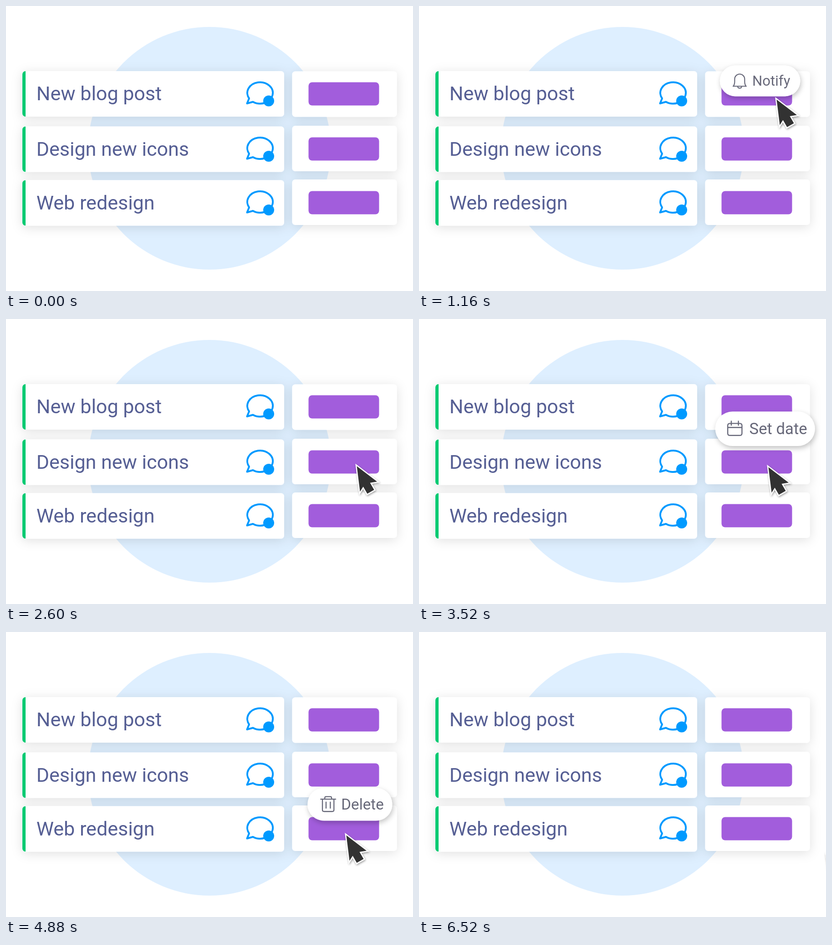
An HTML page for the animation above (8040 ms loop, 894x626 px).

```html
<!DOCTYPE html>
<html lang="en">
<head>
<meta charset="utf-8">
<title>Task board actions</title>
<style>
  html, body { margin: 0; width: 100%; height: 100%; overflow: hidden; background: #fff; }
  svg { display: block; width: 100vw; height: 100vh; }
  text { font-family: Roboto, Arial, sans-serif; }
  .title { font-size: 43px; fill: #565f94; }
  .label { font-size: 35.5px; fill: #676879; }
  .icon { fill: none; stroke: #676879; stroke-width: 2.5; stroke-linecap: round; stroke-linejoin: round; }
</style>
</head>
<body>
<svg viewBox="0 0 894 626" xmlns="http://www.w3.org/2000/svg">
  <defs>
    <filter id="cardShadow" filterUnits="userSpaceOnUse" x="-20" y="80" width="940" height="480">
      <feDropShadow dx="0" dy="4" stdDeviation="12" flood-color="#000" flood-opacity=".12"/>
    </filter>
    <filter id="pillShadow" x="-20%" y="-40%" width="140%" height="190%">
      <feDropShadow dx="2" dy="5" stdDeviation="6" flood-color="#000" flood-opacity=".24"/>
    </filter>
    <filter id="cursorShadow" x="-30%" y="-30%" width="160%" height="160%">
      <feDropShadow dx="1" dy="2" stdDeviation="2" flood-color="#000" flood-opacity=".4"/>
    </filter>
    <clipPath id="cardClip"><rect x="36" y="143" width="575" height="100" rx="7"/></clipPath>
  </defs>

  <circle cx="447" cy="312.5" r="266.5" fill="#deefff"/>
  <g id="cards" fill="#fff" filter="url(#cardShadow)"></g>
  <g id="rows"></g>
  <g id="pills"></g>
  <g id="cursor">
    <path d="M1.5 3.5 46 37.5 30.5 40 39.5 55.5 24.5 64 15.5 48.5 8.5 59.5Z" fill="#333" stroke="#fff"
          stroke-width="5" stroke-miterlimit="8" paint-order="stroke" filter="url(#cursorShadow)"/>
  </g>
</svg>

<script>
const LOOP = 8040, STEP = 40, PERIOD = 1680;
const PILL_START = 800, PILL_TIME = 1760;
const $ = id => document.getElementById(id);

const rows = [
  { title: 'New blog post', left: 143, right: 143.5, chip: 167.5 },
  { title: 'Design new icons', left: 264.5, right: 263, chip: 288.5 },
  { title: 'Web redesign', left: 382.5, right: 381, chip: 406.5 },
];

const pills = [
  { label: 'Notify', width: 201, textX: -19.5, iconX: -51,
    icon: 'M-16.5 13.5H16.5M-16 13.5Q-12.5 9-12.5 2V-4.5A12.5 12.5 0 0 1 12.5-4.5V2Q12.5 9 16 13.5M-5 14Q-4.5 18.5 0 18.5T5 14' },
  { label: 'Set date', width: 224, textX: -35.5, iconX: -68,
    icon: 'M-11-12H11Q16-12 16-7V10Q16 15 11 15H-11Q-16 15-16 10V-7Q-16-12-11-12ZM-16-3H16M-8-17V-8M8-17V-8' },
  { label: 'Delete', width: 199, textX: -20.5, iconX: -51,
    icon: 'M-17.5-12H17.5M-8-12V-15Q-8-18-5-18H5Q8-18 8-15V-12M-13.5-12V13Q-13.5 17-9.5 17H9.5Q13.5 17 13.5 13V-12M-5-5V9M5-5V9' },
];

const easeOut = x => 1 - (1 - x) ** 1.5;
const smooth = x => x * x * (3 - 2 * x);
const moves = [
  { from: 0, to: 800, path: [[-58, 556], [364, 372], [784, 202]], ease: x => 1 - (1 - x) ** 2 },
  { from: 1960, to: 2800, path: [[784, 202], [780, 319], [766, 322]], ease: easeOut },
  { from: 3640, to: 4480, path: [[766, 322], [778, 436], [746, 443]], ease: easeOut },
  { from: 6160, to: 6520, path: [[746, 443], [805, 486], [894, 486]], ease: smooth },
];

const clamp = x => Math.min(1, Math.max(0, x));
const ramp = (a, b, x) => smooth(clamp((x - a) / (b - a)));

$('cards').innerHTML = rows.map(r => `
  <rect x="36" y="${r.left}" width="575" height="100" rx="7"/>
  <rect x="628.5" y="${r.right}" width="230" height="100" rx="7"/>`).join('');

$('rows').innerHTML = rows.map(r => `
  <g transform="translate(0 ${r.left - 143})">
    <rect x="36" y="143" width="7" height="100" fill="#00ca72" clip-path="url(#cardClip)"/>
    <text class="title" x="66.8" y="207.4">${r.title}</text>
    <path d="M529.5 214 534 203A28 23.5 0 1 1 542.5 210.5Z" fill="none" stroke="#009aff"
          stroke-width="4" stroke-linejoin="round"/>
    <circle cx="577" cy="208.5" r="12" fill="#009aff"/>
  </g>
  <rect x="664.5" y="${r.chip}" width="155" height="51" rx="8" fill="#a25ddc"/>`).join('');

$('pills').innerHTML = pills.map(p => `
  <g>
    <rect x="${-p.width / 2}" y="-38.7" width="${p.width}" height="77.4" rx="38.7" fill="#fff" filter="url(#pillShadow)"/>
    <path class="icon" transform="translate(${p.iconX} 0)" d="${p.icon}"/>
    <text class="label" x="${p.textX}" y="12">${p.label}</text>
  </g>`).join('');
const pillNodes = [...$('pills').children];

function cursorAt(t) {
  const move = moves.filter(m => t >= m.from).pop();
  const s = move.ease(clamp((t - move.from) / (move.to - move.from)));
  const [a, b, c] = move.path;
  return [0, 1].map(i => a[i] * (1 - s) ** 2 + 2 * b[i] * s * (1 - s) + c[i] * s * s);
}

function drawPill(node, i, t) {
  const u = (t - PILL_START - i * PERIOD) / PILL_TIME;
  const opacity = ramp(.07, .18, u) * (1 - ramp(.78, 1, u));
  node.style.display = opacity > 0 ? '' : 'none';
  if (!opacity) return;
  // Each pill drifts up and slightly right from the middle of its chip.
  const rise = 106 * (u + .4 * u * (1 - u));
  const scale = Math.min(1, .81 + .36 * u - .13 * u * u);
  node.setAttribute('opacity', opacity);
  node.setAttribute('transform',
    `translate(${742 + rise * .25} ${rows[i].chip + 25.5 - rise}) scale(${scale})`);
}

function draw(t) {
  pillNodes.forEach((node, i) => drawPill(node, i, t));
  $('cursor').setAttribute('transform', `translate(${cursorAt(t)})`);
}

let start;
function tick(now) {
  start ??= now;
  draw(Math.floor((now - start) % LOOP / STEP) * STEP);
  requestAnimationFrame(tick);
}
draw(0);
requestAnimationFrame(tick);
</script>
</body>
</html>
```
